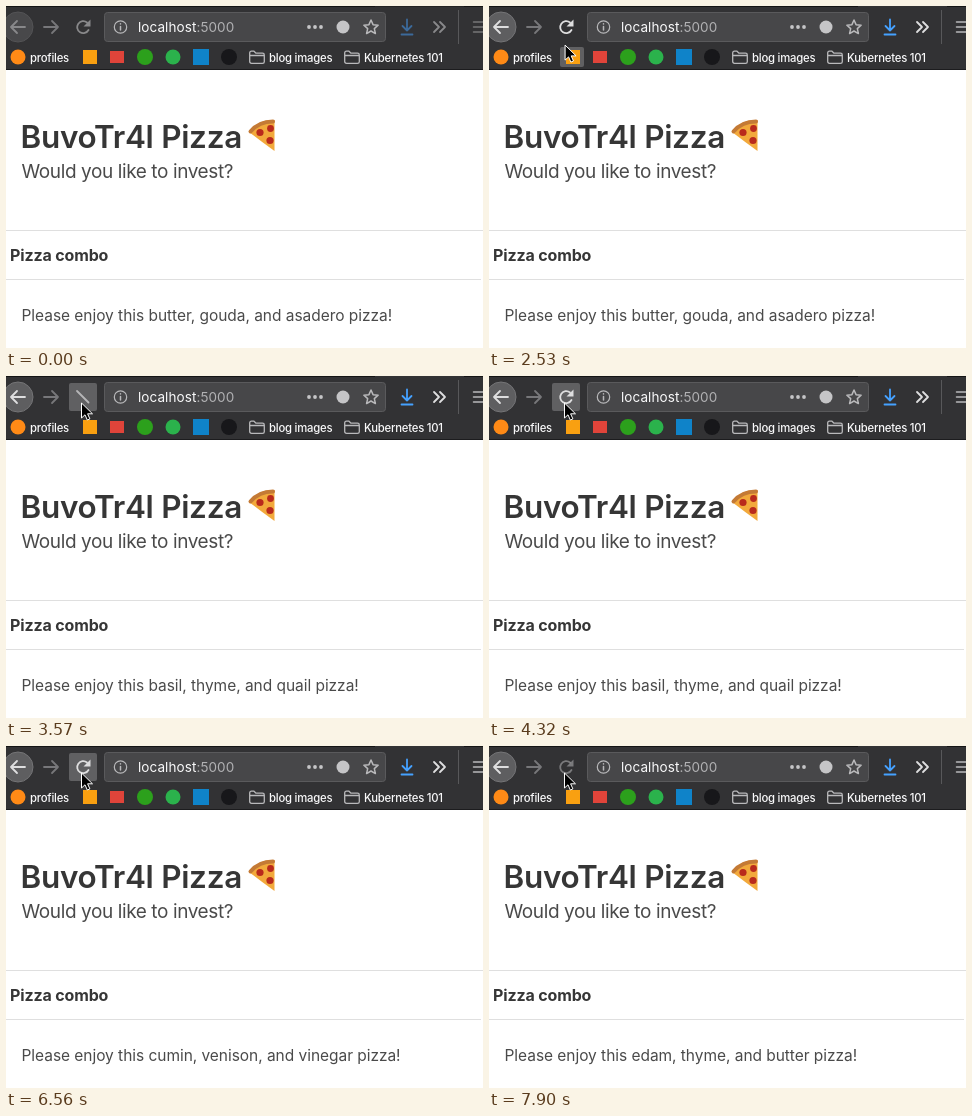
An HTML page for the animation above (8 s loop, 477x342 px).

```html
<!DOCTYPE html>
<html lang="en">
<head>
<meta charset="utf-8">
<title>Pizza combo</title>
<style>
  html, body { margin: 0; width: 100%; height: 100%; overflow: hidden; background: #fff; }
  svg { display: block; }
  text { font-family: Inter, Roboto, sans-serif; font-optical-sizing: none; fill: #4a4a4a; }
  .title { font-size: 31.5px; font-weight: 600; letter-spacing: -.3px; fill: #363636; }
  .sub { font-size: 19px; letter-spacing: -.4px; }
  .head { font-size: 16px; font-weight: 700; letter-spacing: -.14px; fill: #363636; }
  .body { font-size: 15.5px; letter-spacing: -.04px; }
  .url { font-size: 13.5px; letter-spacing: .08px; fill: #f9f9fa; }
  .mark { font-size: 11.3px; font-weight: 500; letter-spacing: -.22px; fill: #f9f9fa; }
  .line { fill: none; stroke: #dededf; stroke-width: 1.8; stroke-linecap: round; stroke-linejoin: round; }
  .soft { stroke: #b9b9bb; stroke-width: 1.5; }
  .idle .dim { opacity: .5; }
</style>
</head>
<body>
<svg id="stage" width="477" height="342" viewBox="0 0 477 342">
  <defs>
    <path id="folder" d="M.7 2.500q0-1.800 1.800-1.800H5l2 2h6.500q1.800 0 1.800 1.800v6.700q0 1.600-1.800 1.600h-11Q.7 12.800 .7 11zM.7 5h14.500"/>
  </defs>

  <!-- browser bars -->
  <rect width="477" height="64" fill="#323234"/>
  <rect width="477" height="1" fill="#141415"/>
  <rect class="dim" x="369" width="89" height="1" fill="#323234"/>
  <rect y="63" width="477" height="1" fill="#1c1c1e"/>
  <g class="dim">
    <circle cx="12" cy="21" r="15" fill="#5e5e60" stroke="#747476"/>
    <path class="line" d="M19 21H5M11 15l-6 6 6 6"/>
  </g>
  <path class="line" style="stroke:#77777a" d="M38 21h14M46 15l6 6-6 6"/>
  <rect id="button" x="63" y="7" width="28" height="28" rx="2" fill="#606062"/>
  <g id="reload" class="dim">
    <path class="line" d="M82.500 24A6 6 0 1 1 81 16.500"/>
    <path d="M84.500 13.500v7h-7z" fill="#dededf"/>
  </g>
  <path id="stop" class="line" style="stroke:#b5b5b7"/>

  <rect x="98.500" y="6.500" width="281" height="29" rx="3" fill="#474749" stroke="#5a5a5c"/>
  <circle class="line soft" cx="114.500" cy="21" r="6.200" style="stroke-width:1.200"/>
  <path class="line soft" d="M114.500 20.500v3.500M114.500 17.800v.1"/>
  <text class="url" x="132" y="26">localhost<tspan fill="#b1b1b3">:5000</tspan></text>
  <g fill="#c5c5c7">
    <circle cx="303" cy="21" r="1.900"/><circle cx="309" cy="21" r="1.900"/><circle cx="315" cy="21" r="1.900"/>
    <circle cx="337" cy="21" r="6.500"/>
  </g>
  <path id="star" class="line soft"/>
  <path class="line dim" style="stroke:#45a1ff" d="M401 13.500v11M396.500 20l4.500 4.500 4.500-4.500M395.500 28.500h11"/>
  <path class="line dim" d="M428 16l5 5-5 5M434 16l5 5-5 5"/>
  <path d="M452.500 4v34" stroke="#58585a"/>
  <path class="line soft dim" d="M467.500 16h12M467.500 21h12M467.500 26h12"/>

  <!-- bookmarks -->
  <rect id="hover" x="71" y="41" width="24" height="20" rx="2" fill="#606062"/>
  <circle cx="12" cy="51" r="7.500" fill="#ff8a16"/>
  <rect x="77" y="44" width="14" height="14" fill="#f9a011"/>
  <rect x="104" y="45" width="14" height="12" fill="#e0443a"/>
  <circle cx="139" cy="51" r="8" fill="#2ca01c"/>
  <circle cx="167" cy="51" r="7.500" fill="#2bb24c"/>
  <rect x="187" y="43" width="16" height="16" fill="#0f83c9"/>
  <circle cx="223" cy="51" r="8" fill="#17171a"/>
  <use href="#folder" x="243" y="44.500" class="line soft" style="stroke-width:1.300"/>
  <use href="#folder" x="338" y="44.500" class="line soft" style="stroke-width:1.300"/>
  <text class="mark" x="24" y="55.500">profiles</text>
  <text class="mark" x="263" y="55.500">blog images</text>
  <text class="mark" x="358" y="55.500">Kubernetes 101</text>

  <!-- page -->
  <text class="title" x="14.500" y="142">BuvoTr4l Pizza</text>
  <path d="M243 126Q252 113 268.500 114V145Q256 136 243 126z" fill="#f2a93b"/>
  <path d="M244.500 125.500Q253 115.500 267 115.500" fill="none" stroke="#c47a35" stroke-width="4" stroke-linecap="round"/>
  <g fill="#b92a1c">
    <circle cx="254" cy="126.500" r="3.600"/><circle cx="264.500" cy="122.500" r="3.400"/><circle cx="264" cy="134.500" r="3.600"/>
  </g>
  <text class="sub" x="15.500" y="172">Would you like to invest?</text>
  <path d="M0 224.500h477M0 273.500h475" stroke="#dfdfdf"/>
  <text class="head" x="4" y="255">Pizza combo</text>
  <text id="order" class="body" x="15.500" y="315"></text>

  <path id="cursor" d="M0 0V15l3.500-3.200 2.300 5.200 2.600-1.100-2.300-5.100H11z" fill="#000" stroke="#fff"/>
</svg>
<script>
const $ = id => document.getElementById(id);
const show = (id, on) => $(id).setAttribute('visibility', on ? 'visible' : 'hidden');

const LOOP = 8000, STEP = 440 / 3, MOVE = 1950, ARRIVE = 2830;
const first = 'butter, gouda, and asadero';
// click: stop icon appears; load: new text; off: button disabled; on: button back
const loads = [
  { click: 3280, load: 3430, off: 3720, on: 4320, mix: 'basil, thyme, and quail' },
  { click: 5820, load: 5960, off: 6110, on: 6560, mix: 'cumin, venison, and vinegar' },
  { click: 7160, load: 7310, off: 7460, on: LOOP, mix: 'edam, thyme, and butter' }
];

const points = Array.from({ length: 10 }, (_, i) => {
  const a = i * Math.PI / 5 - Math.PI / 2, r = i % 2 ? 3.5 : 7.5;
  return `${365 + r * Math.cos(a)} ${21.5 + r * Math.sin(a)}`;
});
$('star').setAttribute('d', `M${points.join('L')}Z`);

function draw(t) {
  $('stage').classList.toggle('idle', t < 1500);

  // the pointer moves in six even steps, slowing down
  const k = Math.min(6, Math.floor((t - MOVE) / STEP + .05));
  const rest = 1 - Math.max(k, 0) / 6;
  show('cursor', k >= 0);
  $('cursor').setAttribute('transform', `translate(${75.5 + 48 * rest ** 4} ${27 + 248 * rest ** 2.75})`);
  show('hover', k === 4);

  const now = loads.find(l => t >= l.click && t < l.on);
  const stopping = now && t < now.off;
  const disabled = now && !stopping;
  show('button', t >= ARRIVE && !disabled);
  show('reload', !stopping);
  $('reload').setAttribute('stroke-opacity', disabled ? .42 : 1);
  $('reload').setAttribute('fill-opacity', disabled ? .42 : 1);
  show('stop', stopping);
  if (stopping) $('stop').setAttribute('d', t < now.load ? 'M71 15l5 5' : 'M71 15l11.500 11.500');

  const mix = loads.reduce((m, l) => t >= l.load ? l.mix : m, first);
  $('order').textContent = `Please enjoy this ${mix} pizza!`;
}

const start = performance.now();
(function tick() {
  draw((performance.now() - start) % LOOP);
  requestAnimationFrame(tick);
})();
</script>
</body>
</html>
```
